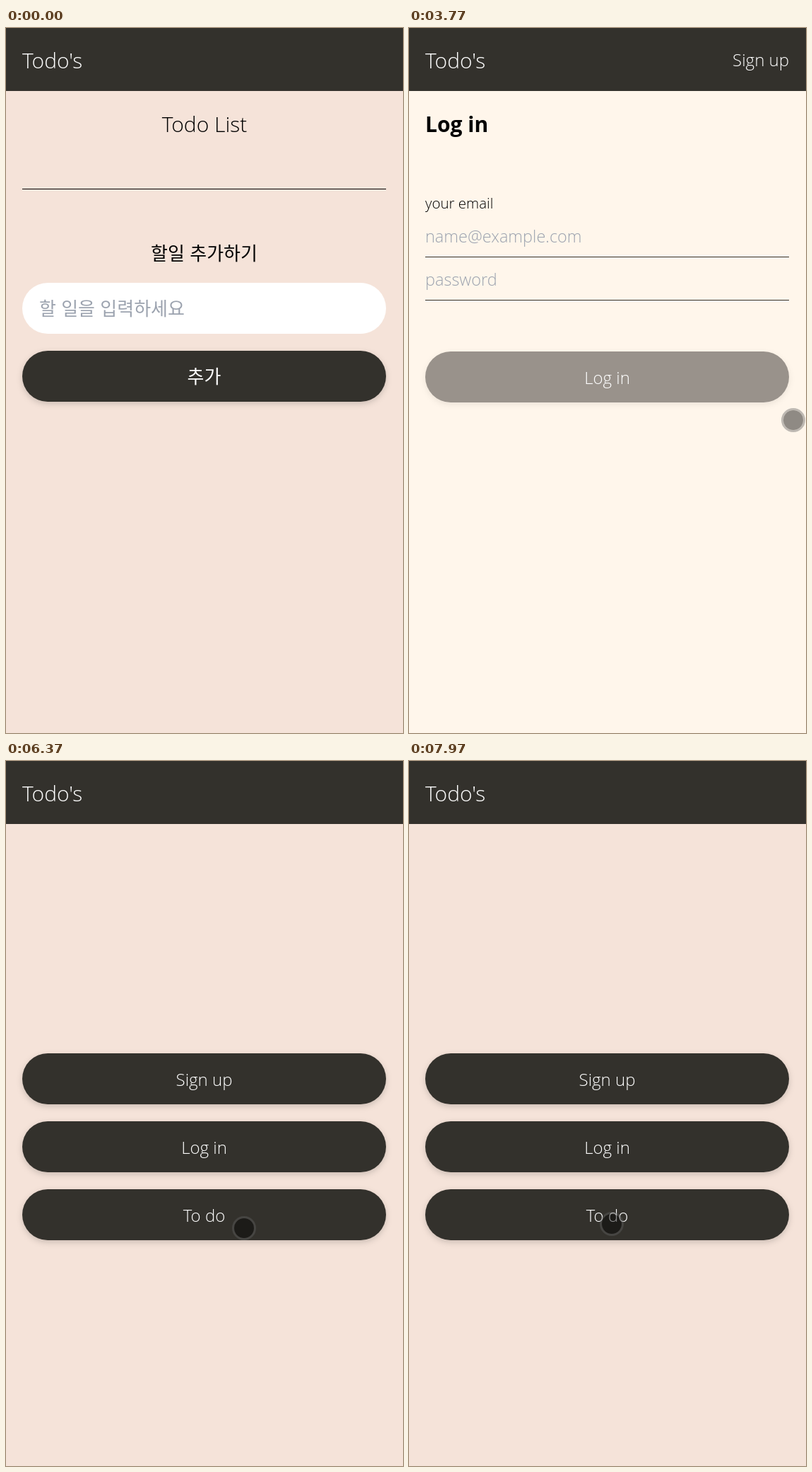
Animation, 562 px wide and 996 px high, one loop 8000 ms. Source, as an HTML page:

```html
<!DOCTYPE html>
<html lang="ko">
<head>
<meta charset="utf-8">
<title>Todo</title>
<style>
  html, body { margin: 0; width: 100%; height: 100%; overflow: hidden; background: #fefefe; }
  svg { display: block; width: 562px; height: 996px; }
  text { font-family: "Open Sans", "Noto Sans", sans-serif; font-weight: 300; font-size: 24px; fill: #000; white-space: pre; }
  .title { font-size: 30px; }
  .bold { font-weight: 700; }
  .label { font-size: 20.5px; }
  .field { font-size: 23.5px; }
  .ko { font-family: "Noto Sans CJK KR", "Noto Sans CJK", sans-serif; font-size: 26px; }
  .light { fill: #fff; }
  .hint { fill: #9ca3af; }
  .mid { text-anchor: middle; }
  .end { text-anchor: end; }
  .bar { fill: #33312c; }
  .button { fill: #33312c; filter: drop-shadow(0 3px 4px rgba(0, 0, 0, .17)); }
  .off { fill: #99928b; filter: drop-shadow(0 3px 4px rgba(0, 0, 0, .08)); }
</style>
</head>
<body>
<svg id="stage" viewBox="0 0 562 996"></svg>
<script>
const LOOP = 8000;
const TICK = 1000 / 15;
const stage = document.getElementById("stage");

const rect = (x, y, w, h, attrs) =>
  `<rect x="${x}" y="${y}" width="${w}" height="${h}" ${attrs}/>`;
const text = (x, y, cls, str) => `<text x="${x}" y="${y}" class="${cls}">${str}</text>`;
const rule = (y, color) => rect(23, y, 515, 1, `fill="${color}"`);
const pill = (y, attrs) => rect(23, y, 515, 72, `rx="36" ${attrs}`);
const button = (y, base, label, cls = "", type = "button") =>
  pill(y, `class="${type}"`) + text(280.5, base, `light mid ${cls}`, label);
const screen = (id, color, body) =>
  `<g id="${id}">` + rect(0, 0, 562, 996, `fill="${color}"`) +
  rect(0, 0, 562, 89, 'class="bar"') +
  text(23, 57, "title light", "Todo's") + body + "</g>";

stage.innerHTML =
  screen("todo", "#f5e3d9",
    text(281, 147, "title mid", "Todo List") +
    rule(227, "#000") +
    text(280.5, 328, "ko mid", "할일 추가하기") +
    pill(360, 'fill="#fff"') +
    text(47, 406, "ko hint", "할 일을 입력하세요") +
    button(456, 502, "추가", "ko")) +
  screen("login", "#fff6eb",
    text(538, 54, "light end", "Sign up") +
    text(23, 147, "title bold", "Log in") +
    text(23, 255, "label", "your email") +
    text(23, 303, "field hint", "name@example.com") +
    rule(323, "#33312c") +
    text(23, 364, "field hint", "password") +
    rule(384, "#33312c") +
    button(457, 503, "Log in", "", "off")) +
  screen("home", "#f5e3d9",
    button(413, 459, "Sign up") +
    button(509, 555, "Log in") +
    button(605, 651, "To do")) +
  '<g id="picked">' + rect(23, 23, 88, 42, 'fill="#31657a"') +
  '<text x="23" y="57" class="title" style="fill:#b9dbe8">Todo\'s</text></g>' +
  '<path id="arrow" d="M.5 .5V23.5L5.5 19L9 26.5L13.5 24.5L10 17.5H17.5Z" fill="#fff" stroke="#000"/>' +
  '<g id="dot"><circle r="14" fill="#000" fill-opacity=".44"/>' +
  '<circle r="15.5" fill="none" stroke="#636363" stroke-opacity=".41" stroke-width="3"/></g>';

// [start, screen]
const screens = [
  [0, "todo"], [500, ""], [3767, "login"], [5433, "home"], [6433, "login"], [7567, "home"]
];
// [start, title selected]
const picks = [[0, false], [5500, true], [5767, false], [7633, true], [7833, false]];
// [time, x, y, shape]; moves run between rows of the same shape
const pointer = [
  [0, 0, 0, ""],
  [2967, 443, 560, "arrow"],
  [3033, 443, 560, "dot"],
  [3433, 544, 554, "dot"],
  [4233, 544, 554, "dot"],
  [4567, 100, 171, "dot"],
  [5100, 100, 171, "dot"],
  [5433, 69, 58, "dot"],
  [5567, 69, 58, "dot"],
  [5833, 356, 525, "dot"],
  [6033, 356, 525, ""],
  [6233, 337, 660, "dot"],
  [6767, 337, 660, "dot"],
  [7167, 110, 138, "dot"],
  [7300, 110, 138, "dot"],
  [7500, 69, 58, "dot"],
  [7633, 69, 58, "dot"],
  [7967, 287, 654, "dot"]
];

const el = id => document.getElementById(id);
const show = (id, on) => el(id).setAttribute("visibility", on ? "visible" : "hidden");
const lastIndex = (rows, t) => {
  let i = rows.length - 1;
  while (i > 0 && rows[i][0] > t) i--;
  return i;
};
const ease = p => p * p * (3 - 2 * p);

function pointerAt(t) {
  const i = lastIndex(pointer, t);
  const [t0, x0, y0, shape] = pointer[i];
  const next = pointer[i + 1];
  if (!next || next[3] !== shape) return [x0, y0, shape];
  const p = ease((t - t0) / (next[0] - t0));
  return [x0 + (next[1] - x0) * p, y0 + (next[2] - y0) * p, shape];
}

// The picture advances 15 times a second, half a tick after zero.
function snap(t) {
  const n = Math.floor((t + 3.4) / TICK - 0.5);
  return Math.max(0, (n + 0.5) * TICK + 0.5);
}

function draw(now) {
  const t = snap(now % LOOP);
  const current = screens[lastIndex(screens, t)][1];
  for (const id of ["todo", "login", "home"]) show(id, id === current);
  show("picked", picks[lastIndex(picks, t)][1]);
  const [x, y, shape] = pointerAt(t);
  for (const id of ["arrow", "dot"]) {
    show(id, id === shape);
    el(id).setAttribute("transform", `translate(${Math.round(x)} ${Math.round(y)})`);
  }
}

const start = performance.now();
function frame() {
  draw(performance.now() - start);
  requestAnimationFrame(frame);
}
frame();
</script>
</body>
</html>
```
